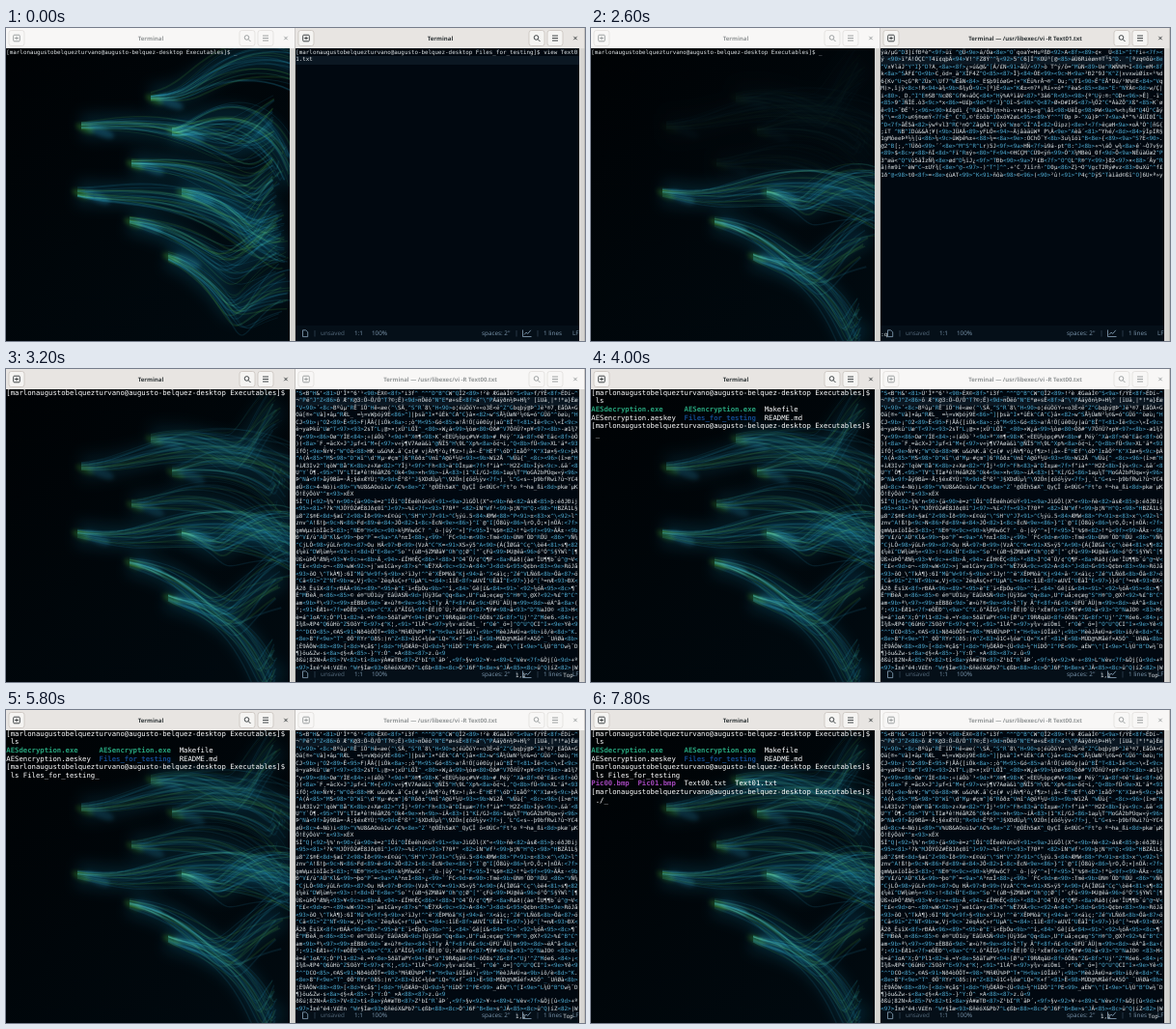
Write an HTML page with a canvas that moves like this. It is 600 by 324 pixels and loops after 8 s.

```html
<!DOCTYPE html>
<html lang="en">
<head>
<meta charset="utf-8">
<title>Two terminals</title>
<style>
html, body { margin: 0; width: 600px; height: 324px; overflow: hidden; background: #00060c; }
canvas, svg { position: absolute; left: 0; top: 0; display: block; }
text { white-space: pre; text-rendering: geometricPrecision; }
.mono { font-family: "DejaVu Sans Mono", monospace; font-size: 5.85px; fill: #dfe4e6; }
.big { font-size: 7.28px; fill: #fff; }
.code { fill: #4fa9cf; }
.exe { fill: #26a27b; font-weight: bold; }
.dir { fill: #12488b; font-weight: bold; }
.pic { fill: #a347ba; font-weight: bold; }
.title { font: 700 6px "Open Sans", sans-serif; text-anchor: middle; }
.status { font: 6.3px "Noto Sans", sans-serif; fill: #7690a6; }
.strip { fill: #d6d5d2; }
.head .bar { fill: #f8f7f6; }
.head .box { fill: #f8f7f6; stroke: #dedbd8; stroke-width: .7; }
.head .icon { fill: none; stroke: #949899; stroke-width: .9; }
.head .title { fill: #929697; }
.head.on .bar { fill: #e8e5e2; }
.head.on .box { fill: #f5f4f2; stroke: #c4beb8; }
.head.on .icon { stroke: #2e3436; }
.head.on .title { fill: #2e3436; }
</style>
</head>
<body>
<canvas id="wall" width="600" height="324"></canvas>
<svg id="stage" width="600" height="324" viewBox="0 0 600 324"></svg>
<script>
const LOOP = 8000, STEP = 200;
const SMALL_ROW = 7.48, BIG_ROW = 8.6, COLS = 83;
const USER = "[marlonaugustobelquezturvano@augusto-belquez-desktop ";
const LEFT_PROMPT = USER + "Executables]$";
const RIGHT_PROMPT = USER + "Files_for_testing]$ ";
const $ = id => document.getElementById(id);

function seeded(seed) {
  return () => {
    seed = (seed * 1664525 + 1013904223) >>> 0;
    return seed / 4294967296;
  };
}

/* Wallpaper: glowing heads that trail wisps of smoke to the right */
const HEADS = [[78, 102], [150, 72], [172, 106], [130, 140], [74, 170], [182, 170], [128, 200], [168, 236]];
const PANE = 294;

function paintSmoke(heads, seed) {
  const layer = document.createElement("canvas");
  layer.width = PANE;
  layer.height = 324;
  const c = layer.getContext("2d"), rnd = seeded(seed);
  const spread = size => (rnd() - .5) * size;
  c.globalCompositeOperation = "screen";

  function wisp(x, y, sway, phase, shift, color, width) {
    const drop = (y - 110) * .45;
    c.strokeStyle = color;
    c.lineWidth = width;
    c.beginPath();
    for (let u = 0; u <= 1.001; u += .04) {
      const angle = phase + u * 5;
      c.lineTo(x + (PANE + 6 - x) * u + 24 * u * Math.cos(angle),
        y + shift * (.12 + u) + drop * u + sway * u * (Math.sin(angle) - Math.sin(phase) * (1 - u)));
    }
    c.stroke();
  }
  function glow(x, y, rx, ry, color) {
    c.fillStyle = color;
    c.beginPath();
    c.ellipse(x, y, rx, ry, .4, 0, 7);
    c.fill();
  }

  for (const [x, y] of heads) {
    const sway = 22 + rnd() * 20, phase = rnd() * 6;
    c.filter = "blur(7px)";
    wisp(x, y, sway, phase, 0, "rgba(8,58,78,.42)", 26);
    c.filter = "blur(.7px)";
    for (let i = 0; i < 22; i++) {
      const color = i % 3 ? "rgba(25,105,130,.2)" : "rgba(50,115,35,.22)";
      wisp(x, y + spread(6), sway + spread(24), phase + spread(.9), spread(44), color, .6 + rnd() * 1.4);
    }
    c.filter = "blur(2px)";
    glow(x + 4, y + 2, 10, 4, "rgba(45,115,18,.5)");
    glow(x + 20, y + 5, 15, 5, "rgba(30,105,135,.4)");
  }
  return layer;
}
const isUpper = ([, y]) => y < 150;
const layers = [
  paintSmoke(HEADS, 5),
  paintSmoke(HEADS.filter(h => !isUpper(h)), 11),
  paintSmoke(HEADS.filter(isUpper), 23)
];

function drawWall(alphas) {
  wall.globalAlpha = 1;
  wall.globalCompositeOperation = "source-over";
  wall.fillStyle = backdrop;
  wall.fillRect(0, 0, PANE, 324);
  wall.globalCompositeOperation = "screen";
  layers.forEach((layer, i) => {
    wall.globalAlpha = alphas[i];
    wall.drawImage(layer, 0, 0);
  });
}
const wall = $("wall").getContext("2d");
const backdrop = wall.createLinearGradient(0, 0, PANE, 324);
backdrop.addColorStop(0, "#000204");
backdrop.addColorStop(1, "#010a10");

/* Text */
const esc = s => s.replace(/&/g, "&amp;").replace(/</g, "&lt;").replace(/>/g, "&gt;");
const span = (s, cls) => `<tspan class="${cls}">${esc(s)}</tspan>`;
const rows = (lines, x, pitch, cls = "") => lines.map((line, i) =>
  `<text class="mono ${cls}" x="${x}" y="${(26.7 + i * pitch).toFixed(2)}">${line}</text>`).join("");
const wrap = s => s.match(new RegExp(`.{1,${COLS}}`, "g")).map(esc);
const typed = (s, t, start, end) =>
  s.slice(0, Math.max(0, Math.round(s.length * (t - start) / (end - start))));

// Random bytes shown the way vi prints binary data
function binaryRow(length, rnd) {
  let out = "", used = 0;
  while (used < length) {
    const byte = Math.floor(rnd() * 256);
    if (byte === 173) continue; // soft hyphen has no width
    let s = String.fromCharCode(byte), coded = true;
    if (byte < 32) s = "^" + String.fromCharCode(byte + 64);
    else if (byte > 126 && byte < 160) s = `<${byte.toString(16)}>`;
    else coded = false;
    s = s.slice(0, length - used);
    used += s.length;
    out += coded ? span(s, "code") : esc(s);
  }
  return out;
}
function binaryFile(count, seed) {
  const rnd = seeded(seed);
  const lines = Array.from({ length: count }, () =>
    binaryRow(rnd() < .12 ? 12 + Math.floor(rnd() * 50) : COLS, rnd));
  return rows(lines, 300.3, SMALL_ROW);
}

/* Windows */
const header = (id, x) => `<g id="${id}" class="head" transform="translate(${x})">
  <rect class="bar" width="300" height="21"/>
  <path class="strip" d="M294 21h6v303h-6z"/>
  <path d="M299.6 0v324" stroke="#aaa7a3" stroke-width=".6"/>
  ${[11, 250, 269].map(c => `<rect class="box" x="${c - 8}" y="2.5" width="16" height="16" rx="2.5"/>`).join("")}
  <g class="icon"><rect x="7.7" y="7.2" width="6.6" height="6.6" rx="1"/>
  <path d="M11 8.7v3.6M9.2 10.5h3.6M251.2 11.7l2.3 2.3M266 8h6M266 10.5h6M266 13h6M288.3 8.8l3.4 3.4M291.7 8.8l-3.4 3.4"/>
  <circle cx="249.5" cy="9.9" r="2.3"/></g>
  <text id="${id}Title" class="title" x="150" y="12.6">Terminal</text></g>`;

const label = (x, s) => `<text class="status" x="${x}" y="318.3">${s}</text>`;

$("stage").innerHTML = `
  <rect x="300" y="21" width="294" height="303" fill="#010810"/>
  <rect x="300" y="29" width="294" height="9" fill="#0b1722"/>
  <rect x="300" y="308" width="294" height="16" fill="#050f18"/>
  <g opacity=".65">${label(326, "unsaved")}</g>
  ${label(361, "1:1")}${label(379, "100%")}${label(493, 'spaces: 2"')}${label(557, "1 lines")}${label(587, "LF")}
  <path d="M307.5 312.8h3.2l2 2v4.8h-5.2zM535.5 312.5v7h9M537 317.5l2-2.4 1.8 1.3 3-3.6" fill="none" stroke="#8ba6bd" stroke-width=".8"/>
  <path d="M320 313v6.5M529 313v6.5M551 313v6.5" stroke="#3d5266" stroke-width=".6"/>
  <g id="shell"></g>
  <g id="file1">${binaryFile(18, 41)}</g>
  <g id="file0">${binaryFile(39, 97)}</g>
  <text id="message" class="mono" x="300.3" y="318.5"></text>
  <text id="ruler" class="mono" x="528" y="318.5"></text>
  <g id="console"></g>
  ${header("left", 0)}${header("right", 300)}`;

// Latest entry whose time has come
const at = (t, keys) => keys.filter(k => k[0] <= t).pop()[1];

function consoleRows(t) {
  if (t < 3000) return rows([LEFT_PROMPT + " _"], .3, SMALL_ROW);
  const lines = [LEFT_PROMPT, " " + typed("ls", t, 3400, 3800)];
  if (t >= 4000) lines.push(
    span("AESdecryption.exe", "exe") + "     " + span("AESencryption.exe", "exe") + "  Makefile",
    "AESencryption.aeskey  " + span("Files_for_testing", "dir") + "  README.md",
    LEFT_PROMPT, " " + typed("ls Files_for_testing", t, 4345, 5800));
  if (t >= 6000) lines.push(
    span("Pic00.bmp", "pic") + "  " + span("Pic01.bmp", "pic") + "  Text00.txt  Text01.txt",
    LEFT_PROMPT, " " + typed("./", t, 7000, 7400));
  if (t >= 3400) lines[lines.length - 1] += "_";
  return rows(lines, .3, BIG_ROW, "big");
}

function shellRows(t) {
  const lines = wrap(RIGHT_PROMPT + "view Text01.txt");
  if (t >= 2800) lines.push(...wrap(RIGHT_PROMPT + (t < 3000 ? "" : "view Text00.txt")));
  return rows(lines, 300.3, SMALL_ROW);
}

function draw(t) {
  const view = at(t, [[0, "shell"], [200, "file1"], [2800, "shell"], [3200, "file0"]]);
  for (const id of ["shell", "file1", "file0"])
    $(id).style.display = id === view ? "" : "none";
  $("shell").innerHTML = shellRows(t);
  $("console").innerHTML = consoleRows(t);

  const leftFocus = t >= 3000;
  $("left").classList.toggle("on", leftFocus);
  $("right").classList.toggle("on", !leftFocus);
  const name = { file1: "Text01.txt", file0: "Text00.txt" }[view];
  $("rightTitle").textContent = name ? `Terminal — /usr/libexec/vi -R ${name}` : "Terminal";

  $("message").textContent = at(t, [[0, ""], [200, '"Text01.txt" [readonly][noeol][converted] 2L, 1448B'],
    [2000, ":"], [2400, ":q"], [2800, ""]]);
  $("ruler").textContent = at(t, [[0, ""], [200, "1,1           All"], [2000, ""], [3200, "1,1           Top"]]);

  const mix = Math.min(1, t / 1000);
  drawWall([1 - mix, mix * .9, mix * (leftFocus ? .7 : .12)]);
}

let shown = -1;
function tick() {
  const step = Math.floor(performance.now() % LOOP / STEP);
  if (step !== shown) draw((shown = step) * STEP);
  requestAnimationFrame(tick);
}
tick();
</script>
</body>
</html>
```
